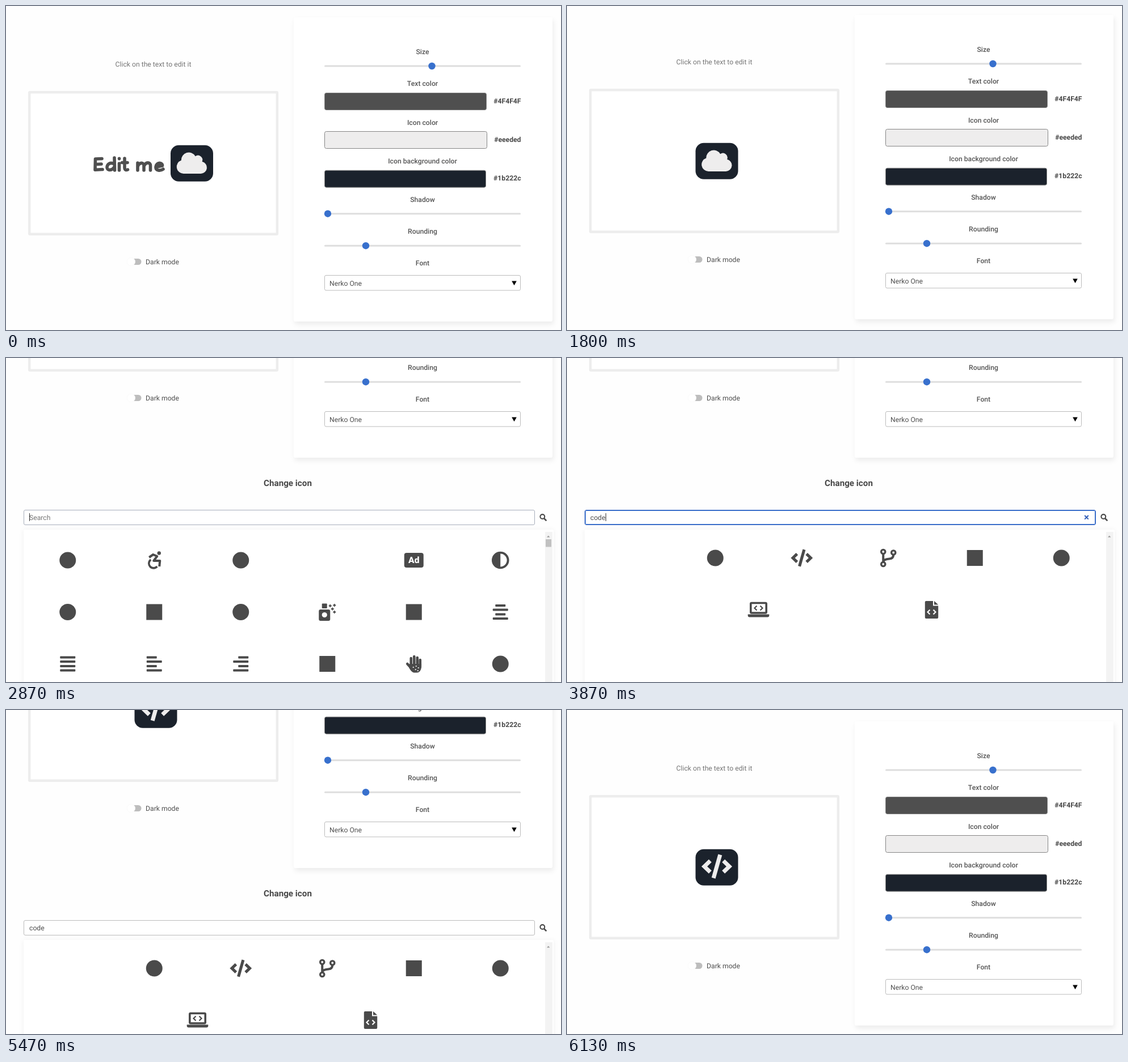
An HTML page for the animation above (8.39 s loop, 978x572 px).

```html
<!DOCTYPE html>
<html lang="en">
<head>
<meta charset="utf-8">
<title>Logo editor</title>
<style>
  html, body { margin: 0; width: 100%; height: 100%; overflow: hidden; background: #fefefe; }
  svg { display: block; }
  text { font: 12.2px Roboto, Arial, sans-serif; fill: #4f4f4f; text-rendering: geometricPrecision; white-space: pre; }
  .label { font-weight: 500; fill: #555; text-anchor: middle; }
  .hex { font-weight: 700; fill: #484848; text-anchor: end; }
  .title { font-size: 15.2px; font-weight: 700; fill: #484848; text-anchor: middle; }
  .soft { fill: #757575; }
  .panel { fill: #fff; filter: drop-shadow(2px 5px 4px rgba(0, 0, 0, .07)); }
  .list { fill: #fff; filter: drop-shadow(0 1px 4px rgba(0, 0, 0, .06)); }
  .icons { fill: #4a4a4a; }
  .line { fill: none; stroke: #4a4a4a; }
  .cut { fill: #fff; }
  .cutline { fill: none; stroke: #fff; }
</style>
</head>
<body>
<svg id="stage" width="978" height="572" viewBox="0 0 978 572"><g id="page"></g></svg>
<script>
const LOOP = 8390, FRAME = 200 / 3;
const SCROLL = 381, PAUSE = 139;
const INK = '#4f4f4f', BLUE = '#3870cd';
const $ = id => document.getElementById(id);

// text centred vertically on y
const text = (x, y, s, cls = '', more = '') =>
  `<text x="${x}" y="${y + 4.3}" class="${cls}" ${more}>${s}</text>`;
const rect = (x, y, w, h, r = 0, more = '') =>
  `<rect x="${x}" y="${y}" width="${w}" height="${h}" rx="${r}" ${more}/>`;
const circle = (x, y, r, more = '') => `<circle cx="${x}" cy="${y}" r="${r}" ${more}/>`;
const line = (d, w, cls = 'line', more = '') => `<path d="${d}" class="${cls}" stroke-width="${w}" ${more}/>`;
const group = (x, y, body, more = '') => `<g transform="translate(${x} ${y})" ${more}>${body}</g>`;

const slider = (y, x) =>
  rect(561, y - 1.5, 346, 3, 1.5, 'fill="#dedede"') + circle(x, y, 6.2, `fill="${BLUE}"`);
const swatch = (y, w, color, hex) =>
  rect(561.5, y + .5, w - 1, 30, 3, `fill="${color}" stroke="#858585"`) + text(907.5, y + 14.3, hex, 'hex');

const codeMark = (scale, color) =>
  `<g transform="scale(${scale}) translate(-320 -256)" fill="none" stroke="${color}" stroke-width="84">
    <path d="M182 138L60 256L182 374M458 138L580 256L458 374"/><path d="M251 500L389 12"/></g>`;

const cloud = `<path transform="scale(.0835) translate(-320 -256)" fill="#eeeded"
  d="M537 227A96 96 0 0 0 394 112A160 160 0 0 0 96 200A144 144 0 0 0 144 480H512A128 128 0 0 0 537 227Z"/>`;

const lettering = line(
  'M169 269.5L157.5 270L157 289.3L170 288.5M157.5 279.5L168 279' +
  'M191 268L191.5 290M191 279C184 275 178 279 178 285C178 291 187 291 191 284' +
  'M199.5 278V290M199.5 269.3V269.6' +
  'M209 269V285C209 290 212 290 214.5 289M204.5 276.5H214' +
  'M232 277V290M232 284C234 276 243 275 243 282V290M243 283C246 275 254.5 275 254.5 282V290' +
  'M264 284.5L275.5 282C276 276 265 275 264 284C263.5 291 272 291.5 277 288',
  5.6, '', `id="ink" fill="none" stroke="${INK}" stroke-linecap="round" stroke-linejoin="round"`);

const editor =
  text(259.5, 102.5, 'Click on the text to edit it', 'soft', 'text-anchor="middle"') +
  rect(41.2, 152.2, 436.6, 250.6, 1, 'fill="#fff" stroke="#ededed" stroke-width="4.4"') +
  `<g id="words" role="img" aria-label="Edit me">${rect(152, 256, 129, 46, 0, 'id="select" fill="#3297fd"')}${lettering}</g>` +
  rect(217, 256, 1.5, 44, 0, `id="caret" fill="${INK}"`) +
  `<g id="logo">${rect(-37.5, -32, 75, 64, 14.5, 'fill="#1b222c"')}
    <g id="cloud">${group(0, -.5, cloud)}</g><g id="code">${group(0, -1.5, codeMark(.0845, '#eeeded'))}</g></g>` +
  rect(214, 446, 24.5, 11, 5.5, 'fill="#bdbdbd"') +
  circle(220.5, 451.5, 7.2, 'fill="#fff" stroke="#f6f6f6" stroke-width=".6"') +
  text(246, 451.8, 'Dark mode');

const labels = [['Size', 81], ['Text color', 137], ['Icon color', 205.5], ['Icon background color', 273.5],
  ['Shadow', 342], ['Rounding', 398], ['Font', 453.5]];
const panel =
  rect(507, 20, 456, 537, 3, 'class="panel"') +
  labels.map(([s, y]) => text(734, y, s, 'label')).join('') +
  slider(106, 750.5) + slider(366.7, 567) + slider(423.2, 634) +
  swatch(153, 286, INK, '#4F4F4F') + swatch(221, 287, '#eeeded', '#eeeded') + swatch(289.7, 285, '#1b222c', '#1b222c') +
  rect(561.5, 475.5, 345, 26.5, 2.5, 'fill="#fff" stroke="#bbb"') +
  text(570, 489.3, 'Nerko One') + '<path d="M891.2 485.5H899.8L895.5 493.2Z"/>';

const dot = circle(0, 0, 14.5), square = rect(-14, -14, 28, 28);
const bars = (short, x) => [-11.5, -3.9, 3.9, 11.5].map((y, i) =>
  rect(i % 2 ? -13.5 : x, y - 2, i % 2 ? 27 : short, 4, 1)).join('');
const plus = (x, y) => `M${x - 2.5} ${y}h5M${x} ${y - 2.5}v5`;
const angles = (x, y) => `M${x - 3} ${y - 4}l-4 4l4 4M${x + 3} ${y - 4}l4 4l-4 4`;

const wheelchair = circle(8.5, -12.5, 3.2) +
  line('M-9 -5L-2 -10L5 -7L-1 1L10 1L9 11', 4, 'line', 'stroke-linejoin="round"') +
  line('M-6 -1A8.2 8.2 0 1 0 5 11', 3.6);
const ad = rect(-17, -13, 34, 26, 4) +
  '<text y="5.3" text-anchor="middle" style="font-size:15.5px;font-weight:900;fill:#fff">Ad</text>';
const contrast = circle(0, 0, 15.3) + '<path d="M0 -11.4A11.4 11.4 0 0 1 0 11.4Z" class="cut"/>';
const spray = rect(-15, -4.5, 20, 20, 3) + rect(-9.5, -15, 9, 8.5, 1) + circle(-5, 5, 4.6, 'class="cut"') +
  line(plus(5, -11) + plus(12.5, -12) + plus(9, -5.5) + plus(12.5, 0), 1.8);
const hand = line('M-5 2V-10M.5 0V-13M6 0V-11M11 3V-7M-6 6L-11.5 0', 4.6, 'line', 'stroke-linecap="round"') +
  '<path d="M-7.5 0H13.3V6Q12 15.5 5 15.5H0Q-4 15 -8.5 7Z"/>' +
  [[-1, 6], [4, 4], [8, 7], [3, 10], [7, 12]].map(([x, y]) => circle(x, y, 1.1, 'class="cut"')).join('');
const branch = circle(-9, -11, 3.6, 'class="line" stroke-width="3.4"') + circle(-9, 11, 3.6, 'class="line" stroke-width="3.4"') +
  circle(9, -9.5, 3.6, 'class="line" stroke-width="3.4"') +
  line('M-9 -7V7M9 -6Q9 1 2 1.5Q-8 2 -9 7', 4);
const laptop = rect(-13.7, -12, 27.4, 17.5, 1.5, 'class="line" stroke-width="3.6"') +
  '<path d="M-18.8 8H18.8V10Q18.8 13 15.8 13H-15.8Q-18.8 13 -18.8 10Z"/>' + line(angles(0, -3), 2.2);
const file = '<path d="M-11.7 -13.5Q-11.7 -15.5 -9.7 -15.5H2.5V-7H11.7V13.5Q11.7 15.5 9.7 15.5H-9.7Q-11.7 15.5 -11.7 13.5ZM4.5 -15.5L11.7 -9H4.5Z"/>' +
  line(angles(0, 4), 2.2, 'cutline');

const allIcons = [
  [dot, wheelchair, dot, '', ad, contrast],
  [dot, square, dot, spray, square, bars(18, -9)],
  [bars(27, -13.5), bars(18, -13.5), bars(18, -4.5), square, hand, dot]];
const codeIcons = [
  ['', dot, codeMark(.0605, '#4a4a4a'), branch, square, dot],
  [laptop, '', file]];
const grid = (rows, top, id) => `<g id="${id}" class="icons">` + rows.map((row, j) =>
  row.map((icon, i) => group(490 + (i - (row.length - 1) / 2) * 152.5, top + j * 91.5, icon)).join('')).join('') + '</g>';

const search =
  text(496.5, 222, 'Change icon', 'title') +
  rect(31, 303, 934, 420, 2, 'class="list"') +
  rect(31.5, 268.5, 900, 26, 2.5, 'id="field" fill="#fff"') +
  rect(32.5, 269.5, 898, 24, 1.5, `id="ring" fill="none" stroke="${BLUE}"`) +
  text(41, 281.3, 'Search', 'soft', 'id="hint"') + text(41, 281.3, '', '', 'id="typed"') +
  rect(0, 274, 1, 14, 0, 'id="bar" fill="#333"') +
  line('M912.2 278l6.6 6.6m0 -6.6l-6.6 6.6', 2, '', 'id="clear" stroke="#3560b8"') +
  circle(945.3, 280, 3.9, 'class="line" stroke-width="2.1"') + line('M948 283L952.3 287.3', 2.6) +
  rect(950, 307, 13, 416, 0, 'fill="#f3f3f3"') +
  '<path d="M953 316.5H958.4L955.7 313.5Z" fill="#9a9a9a"/>' +
  rect(951, 320, 10, 13.5, 0, 'id="thumb" fill="#c1c1c1"') +
  grid(allIcons, 357, 'all') + grid(codeIcons, 353, 'found');

$('page').innerHTML = panel + editor + group(0, SCROLL, search);

const typing = [[3390, 'c'], [3530, 'co'], [3660, 'cod'], [3860, 'code']];
const clamp = x => Math.min(1, Math.max(0, x));
const ease = (t, a, b) => { const x = clamp((t - a) / (b - a)); return x * x * (3 - 2 * x); };
const show = (id, on) => { $(id).style.display = on ? '' : 'none'; };
const within = (t, a, b) => t >= a - 5 && t < b - 5;

function draw(t) {
  const y = SCROLL * ease(t, 1773, 2195) - (SCROLL - PAUSE) * ease(t, 5300, 5670) - PAUSE * ease(t, 5837, 6130);
  $('page').setAttribute('transform', `translate(0 ${-Math.round(y)})`);

  // preview: select, delete, then the new icon
  const hasWords = t < 795, marked = within(t, 400, 800), swapped = t >= 4725;
  show('words', hasWords);
  show('select', marked);
  $('ink').setAttribute('stroke', marked ? '#fff' : INK);
  show('caret', within(t, 800, 1330));
  $('logo').setAttribute('transform', `translate(${hasWords ? 327.5 : 264} 277.7)`);
  show('cloud', !swapped);
  show('code', swapped);

  // search field
  const glow = clamp((t - 2840) / 200) * (1 - clamp((t - 4705) / 200));
  const mix = [[187, 56], [187, 104], [187, 196]].map(([a, b]) => Math.round(a + (b - a) * glow));
  $('field').setAttribute('stroke', `rgb(${mix})`);
  $('ring').setAttribute('opacity', glow * glow);
  const word = typing.reduce((s, [at, w]) => t >= at ? w : s, '');
  $('typed').textContent = word;
  show('hint', !word);
  show('clear', word && t < 4725);
  show('bar', within(t, 2870, 4400));
  $('bar').setAttribute('x', 41 + (word ? Math.round($('typed').getComputedTextLength()) : 0));
  const filtered = word.length > 2;
  show('all', !filtered);
  show('thumb', !filtered);
  show('found', filtered);
}

function tick() {
  const t = performance.now() % LOOP;
  draw(Math.floor((t + 4) / FRAME) * FRAME);
  requestAnimationFrame(tick);
}
tick();
</script>
</body>
</html>
```
